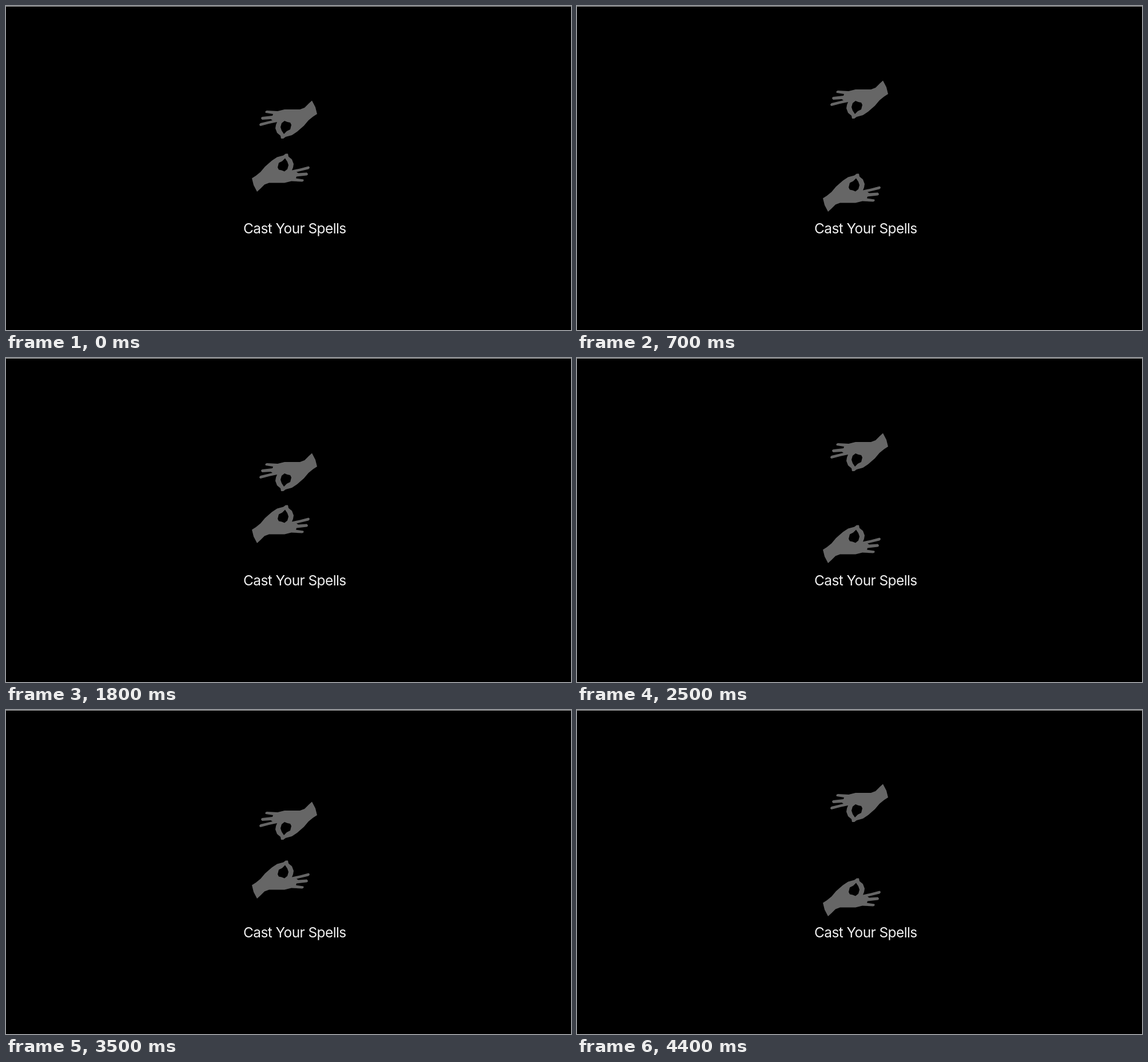
An HTML page for the animation above (4500 ms loop, 988 px wide and 567 px high).

```html
<!DOCTYPE html>
<html lang="en">
<head>
<meta charset="utf-8">
<title>Cast Your Spells</title>
<style>
  html, body { margin: 0; width: 100%; height: 100%; overflow: hidden; background: #000; }
  svg { display: block; }
  text {
    font: 400 24.5px Inter, "Liberation Sans", sans-serif;
    letter-spacing: -.6px; fill: #f0f0f0; text-anchor: middle;
  }
</style>
</head>
<body>
<svg width="988" height="567" viewBox="0 0 988 567">
  <rect width="988" height="1" fill="#a6a6a6"/>
  <g id="hand" fill="#666" fill-rule="evenodd">
    <path d="M535 165.5 L529 171 522 178 514 181 487 181 475 184 456 183
      Q452 184 454 187 L467 189 466 192 448 194 Q444 196 448 199 L463 198 466 200 445 205
      Q441 208 445 210 L460 206 474 203 472 208 471 214 474 222 480 227 481 232 485 232 489 229
      500 226 509 220 521 209.5 529 200 537 193.5 544 189 541 177 Z
      M487 201 L492 203 497 204 499 208 497 216 491 219 486 224 482 218 480 212 482 205 Z"/>
  </g>
  <use href="#hand" transform="rotate(180 487 245.25)"/>
  <text x="504.8" y="397.5">Cast Your Spells</text>
</svg>
<script>
  const LOOP = 4500, STEP = 100, REST_Y = 165.5;
  const hand = document.getElementById('hand');

  // [time, top edge of the upper hand]: drifts in almost steadily, springs apart smoothly
  const keys = [
    [0, 165.5], [220, 177.5], [785, 127.5], [2070, 177.5],
    [2600, 127.5], [3920, 177.5], [4470, 127.5], [4500, 128]
  ];

  function handTop(time) {
    const i = keys.findIndex(key => key[0] > time);
    const [t0, y0] = keys[i - 1], [t1, y1] = keys[i];
    const u = (time - t0) / (t1 - t0);
    const eased = y1 < y0 ? (1 - Math.cos(Math.PI * u)) / 2 : u ** 1.1;
    return y0 + (y1 - y0) * eased;
  }

  function draw() {
    const time = Math.floor(performance.now() % LOOP / STEP) * STEP;
    const shift = Math.round(handTop(time) - REST_Y);
    hand.setAttribute('transform', `translate(0 ${shift})`);
    requestAnimationFrame(draw);
  }
  draw();
</script>
</body>
</html>
```
